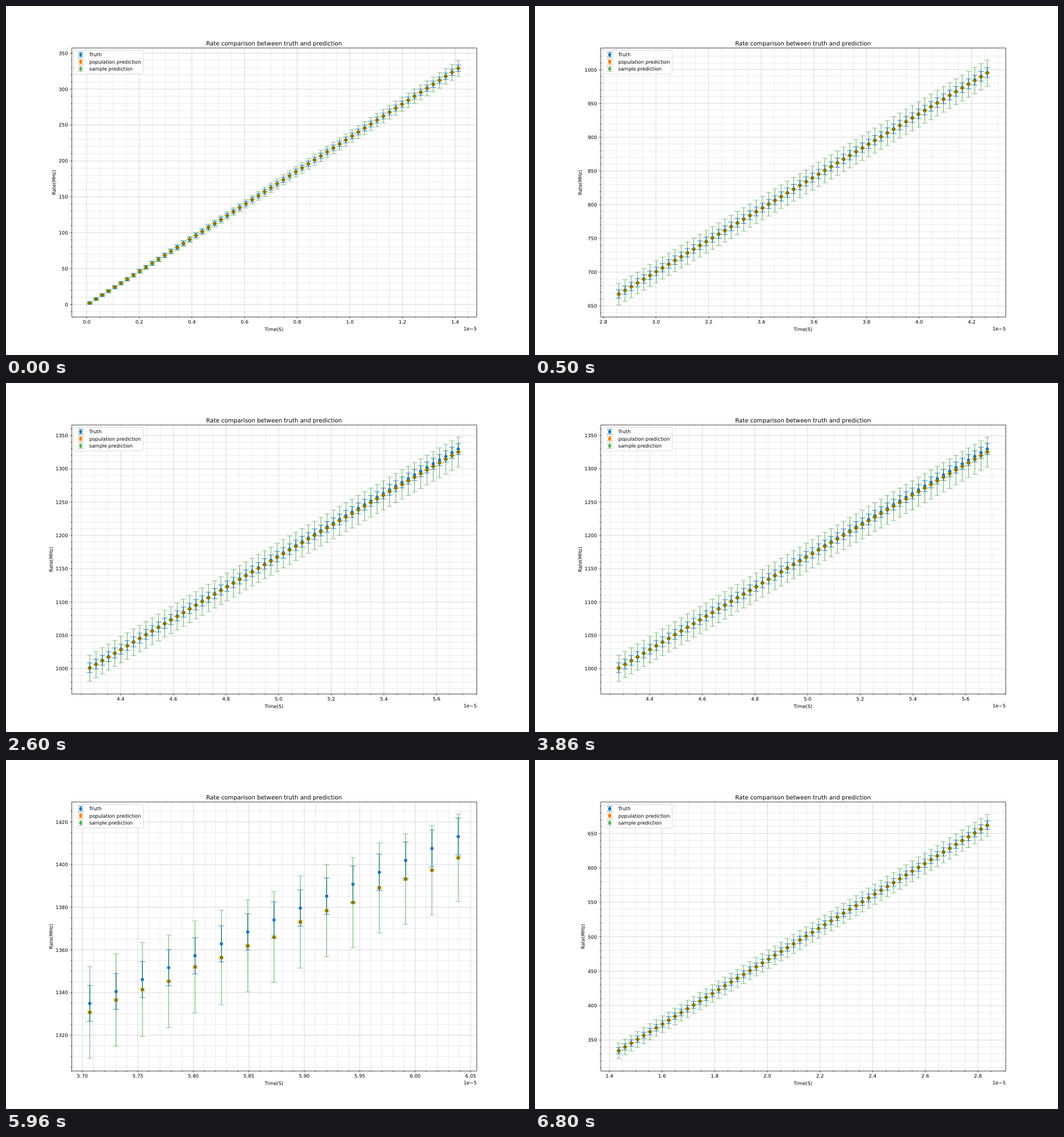
Recreate the animation shown at these times as an HTML page. Size 917 by 611 pixels, loop 8000 ms.

```html
<!DOCTYPE html>
<html lang="en">
<head>
<meta charset="utf-8">
<title>Rate comparison</title>
<style>
html, body { margin: 0; width: 100%; height: 100%; overflow: hidden; background: #fff; }
svg { display: block; width: 917px; height: 611px; }
text { font: 8.49px "DejaVu Sans", Verdana, sans-serif; fill: #000; text-rendering: geometricPrecision; }
.title { font-size: 10.19px; }
.mid { text-anchor: middle; }
.end { text-anchor: end; }
path { fill: none; }
.major { stroke: #b0b0b0; stroke-width: .7; stroke-dasharray: 2.51 1.09; }
.minor { stroke: #b0b0b0; stroke-width: .7; stroke-dasharray: .68 1.12; }
.tick { stroke: #000; stroke-width: .65; }
.spine { fill: none; stroke: #000; stroke-width: .7; }
.bar { stroke-width: 1.27; }
.cap { stroke-width: .85; }
.page { visibility: hidden; animation: 8s step-end infinite; }
#p0 { animation-name: a; }
#p1 { animation-name: b; }
#p2 { animation-name: c; }
#p3 { animation-name: d; }
#p4 { animation-name: e; }
@keyframes a { 0% { visibility: visible } 6.25%, 100% { visibility: hidden } }
@keyframes b { 0% { visibility: hidden } 6.25% { visibility: visible } 32.5%, 100% { visibility: hidden } }
@keyframes c { 0% { visibility: hidden } 32.5% { visibility: visible } 58.75%, 100% { visibility: hidden } }
@keyframes d { 0% { visibility: hidden } 58.75% { visibility: visible } 85%, 100% { visibility: hidden } }
@keyframes e { 0% { visibility: hidden } 85%, 100% { visibility: visible } }
</style>
</head>
<body>
<svg id="chart" viewBox="0 0 917 611"></svg>
<script>
const L = 115.23, R = 825.56, T = 73.66, B = 544.36, FIRST = 146.92, SPAN = 646.05, CAP = 5;
const BLUE = '#1f77b4', ORANGE = '#ff7f0e', GREEN = '#008000';

// x, y: [tick value, its pixel, pixels per unit, major step, minor parts]
const pages = [
  { start: 0, n: 60, x: [0, 141.4, 461.5, .2, 4], y: [0, 522.6, 1.257, 50, 5], label: 87 },
  { start: 120, n: 60, x: [3, 212.1, 461.4, .2, 4], y: [650, 525, 1.1814, 50, 5], label: 81.7 },
  { start: 180, n: 60, x: [4.4, 201, 461.6, .2, 4], y: [1000, 500, 1.1657, 50, 5], label: 81.7 },
  { start: 240, n: 15, x: [5.7, 134, 1945, .05, 5], y: [1420, 108.5, 3.733, 20, 4], label: 81.7 },
  { start: 60, n: 60, x: [1.4, 130.5, 461.5, .2, 4], y: [350, 490.3, 1.2057, 50, 5], label: 87 }
];

const tailRate = [1330.7, 1336.5, 1341.4, 1345.3, 1352, 1356.4, 1361.9, 1366,
  1373.1, 1378.4, 1382.2, 1389.1, 1393.2, 1397.4, 1403.2];
const tailError = [21.55, 21.6, 22.05, 21.75, 21.55, 22.2, 21.6, 21.3,
  21.6, 21.6, 21.1, 21.1, 21.2, 20.95, 20.5];

function sample(k) {
  if (k >= 240) {
    const i = k - 240;
    return { truth: 1334.9 + 5.59 * i, rate: tailRate[i], error: tailError[i] };
  }
  const truth = 2 + 5.539 * k + .00007 * k * k;
  const rate = truth - k / 250 - 3.6 * Math.max(0, (k - 180) / 59) ** 3;
  const error = k < 60 ? 11.2 * (rate / 329) ** .75 : .617 * Math.sqrt(rate);
  return { truth, rate, error };
}

const f = v => v.toFixed(2);
const hLine = (x1, x2, y) => `M${f(x1)} ${f(y)}H${f(x2)}`;
const vLine = (x, y1, y2) => `M${f(x)} ${f(y1)}V${f(y2)}`;
const path = (cls, d, color) => `<path class="${cls}" d="${d}"${color ? ` stroke="${color}"` : ''}/>`;
const text = (x, y, s, cls = '') => `<text x="${f(x)}" y="${f(y)}" class="${cls}">${s}</text>`;

// points: [x, y, half height]
const bars = (points, color, alpha) => `<g opacity="${alpha}">` +
  path('bar', points.map(([x, y, h]) => vLine(x, y - h, y + h)).join(''), color) + '</g>';

// Fill and outline are blended separately, so a translucent dot has a denser rim.
function marks(points, color, alpha) {
  const dots = points.map(([x, y]) => `<circle cx="${f(x)}" cy="${f(y)}" r="2.55"/>`).join('');
  const caps = points.map(([x, y, h]) =>
    hLine(x - CAP, x + CAP, y - h) + hLine(x - CAP, x + CAP, y + h)).join('');
  return `<g fill="${color}" stroke="${color}" stroke-width=".85" fill-opacity="${alpha}" stroke-opacity="${alpha}">${dots}</g>` +
    `<g opacity="${alpha}">${path('cap', caps, color)}</g>`;
}

function axis([base, pos, scale, step, parts], horizontal) {
  const dir = horizontal ? 1 : -1;
  const [lo, hi] = horizontal ? [L - .8, R] : [T, B];
  const grid = { major: '', minor: '' };
  let ticks = '', labels = '';
  for (let j = -100; j <= 100; j++) {
    const value = base + j * step / parts;
    const p = pos + dir * j * step / parts * scale;
    if (p < lo || p > hi) continue;
    const kind = j % parts ? 'minor' : 'major';
    const len = kind === 'major' ? 2.97 : 1.7;
    grid[kind] += horizontal ? vLine(p, B, T) : hLine(L, R, p);
    ticks += horizontal ? vLine(p, B, B + len) : hLine(L - len, L, p);
    if (kind === 'minor') continue;
    labels += horizontal
      ? text(p, 556.4, value.toFixed(step < .1 ? 2 : 1), 'mid')
      : text(108.6, p + 3.1, Math.round(value), 'end');
  }
  return { grid: path('minor', grid.minor) + path('major', grid.major), rest: path('tick', ticks) + labels };
}

function page(p, id) {
  const [base, pos, scale] = p.y;
  const toY = v => pos - (v - base) * scale;
  const truth = [], population = [], drawn = [];
  for (let i = 0; i < p.n; i++) {
    const s = sample(p.start + i), x = FIRST + SPAN * i / (p.n - 1);
    truth.push([x, toY(s.truth), Math.sqrt(4 + .05 * s.truth) * scale]);
    population.push([x, toY(s.rate), s.rate / 1374 * .55 * scale]);
    drawn.push([x, toY(s.rate), s.error * scale]);
  }
  const ax = axis(p.x, true), ay = axis(p.y, false);
  const series = [[truth, BLUE, 1], [population, ORANGE, 1], [drawn, GREEN, .5]];
  return `<g class="page" id="p${id}">` + ax.grid + ay.grid +
    series.map(s => bars(...s)).join('') + series.map(s => marks(...s)).join('') +
    ax.rest + ay.rest +
    `<text class="mid" transform="translate(${p.label} 309) rotate(-90)">Rate(MHz)</text></g>`;
}

function legend() {
  const rows = [['Truth', BLUE, 1], ['population prediction', ORANGE, 1], ['sample prediction', GREEN, .5]];
  return '<rect x="118.8" y="77.6" width="121.7" height="41.4" rx="1.7" fill="#fff" stroke="#ccc" stroke-width=".85" opacity=".8"/>' +
    rows.map(([name, color, alpha], i) => {
      const y = 85.2 + 12.45 * i, point = [[131, y, 4.24]];
      return bars(point, color, alpha) + marks(point, color, alpha) + text(146, y + 2.9, name);
    }).join('');
}

document.getElementById('chart').innerHTML = pages.map(page).join('') +
  `<rect class="spine" x="${L}" y="${T}" width="${R - L}" height="${B - T}"/>` + legend() +
  text(470, 68.6, 'Rate comparison between truth and prediction', 'title mid') +
  text(470, 568.8, 'Time(S)', 'mid') + text(825.3, 567.8, '1e\u22125', 'end');
</script>
</body>
</html>
```
